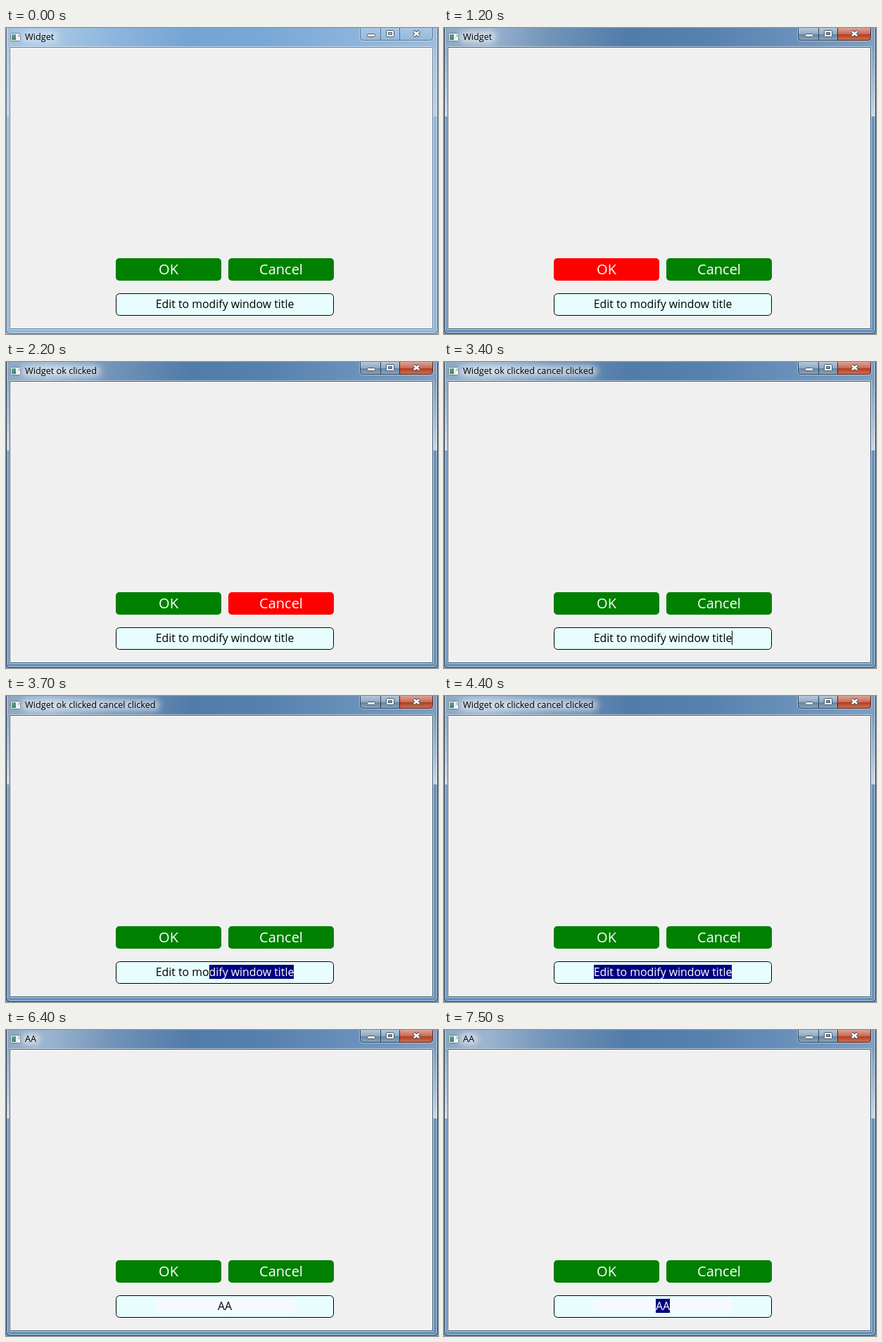
Animation of 614 by 436 pixels, one loop 8000 ms. Source, as an HTML page with a canvas:

```html
<!DOCTYPE html>
<html lang="en">
<head>
<meta charset="utf-8">
<title>Widget</title>
<style>
  html, body { margin: 0; width: 100%; height: 100%; overflow: hidden; }
  canvas { display: block; }
</style>
</head>
<body>
<canvas id="stage" width="614" height="436"></canvas>
<script>
const ctx = document.getElementById('stage').getContext('2d');
const LOOP = 8000;
const FONT = '"Open Sans", "Noto Sans", sans-serif';
const HINT = 'Edit to modify window title';

// Each entry overrides part of the state from its time on.
const timeline = [
  [0, { title: 'Widget', text: HINT, active: false, pressed: '', caret: false, from: null, edited: false }],
  [1200, { active: true, pressed: 'OK' }],
  [1300, { pressed: '', title: 'Widget ok clicked' }],
  [2200, { pressed: 'Cancel' }],
  [2300, { pressed: '', title: 'Widget ok clicked cancel clicked' }],
  [3400, { caret: true }],
  [3500, { from: 24 }],
  [3600, { from: 18 }],
  [3700, { from: 10 }],
  [3800, { from: 3 }],
  [3900, { from: 0 }],
  [4400, { caret: false }],
  [4600, { title: 'A', text: 'A', caret: true, from: null, edited: true }],
  [4800, { title: 'AA', text: 'AA' }],
  [5300, { caret: false }],
  [5800, { caret: true }],
  [6400, { caret: false }],
  [6900, { from: 0 }],
  [7400, { caret: true }],
  [7500, { caret: false }]
];

function stateAt(time) {
  return Object.assign({}, ...timeline.filter(step => step[0] <= time).map(step => step[1]));
}

function gradient(x0, y0, x1, y1, stops) {
  const g = ctx.createLinearGradient(x0, y0, x1, y1);
  stops.forEach(([at, color]) => g.addColorStop(at, color));
  return g;
}

function rect(x, y, w, h, fill) {
  ctx.fillStyle = fill;
  ctx.fillRect(x, y, w, h);
}

function box(x, y, w, h, radius, fill, stroke) {
  ctx.beginPath();
  ctx.roundRect(x, y, w, h, radius);
  if (fill) { ctx.fillStyle = fill; ctx.fill(); }
  if (stroke) { ctx.strokeStyle = stroke; ctx.lineWidth = 1; ctx.stroke(); }
}

function label(text, x, y, size, color, align = 'left') {
  ctx.font = `${size}px ${FONT}`;
  ctx.textAlign = align;
  ctx.fillStyle = color;
  ctx.fillText(text, x, y);
}

function drawFrame(active) {
  const bar = active
    ? ['#8ba7c4', '#9bb4cf', '#7193b8', '#517ba9', '#5680ad', '#6890ba', '#7c9fc4']
    : ['#a3c3e2', '#a9c8e5', '#8db5dd', '#74a4d4', '#79a8d6', '#8ab3dc', '#9abde0'];
  const stops = [0, .1, .25, .43, .6, .8, 1].map((at, i) => [at, bar[i]]);
  rect(0, 0, 614, 436, active ? '#6792bd' : '#8fb6de');
  rect(0, 0, 614, 28, gradient(0, 0, 610, 50, stops));

  // Light reflection on both sides, ending in a hard edge
  const shine = active
    ? [[0, '#819fbe'], [.6, '#a6bed6'], [1, '#c8d8e7']]
    : [[0, '#a0c1e1'], [1, '#b8d1e9']];
  for (const x of [0, 607]) rect(x, 28, 7, 98, gradient(0, 28, 0, 126, shine));

  box(.5, -6.5, 613, 442, 6, null, active ? '#1c2b3b' : '#4d6278');
  box(1.5, -5.5, 611, 440, 5, null, 'rgba(255,255,255,.55)');
  box(4.5, 26.5, 603, 403, 1, null, 'rgba(255,255,255,.6)');
  box(5.5, 27.5, 601, 401, 0, '#f0f0f0', active ? '#3e566f' : '#62798f');
}

function drawIcon() {
  box(6.5, 7.5, 14, 11, 1, '#fafcfc', '#6d7882');
  rect(8, 9, 6, 8, gradient(8, 9, 14, 17, [[0, '#6fa6a0'], [1, '#2d8062']]));
  rect(15, 9, 2, 8, '#e2e9ed');
  rect(18, 9, 1, 4, '#4a8b80');
}

function drawTitle(title, active) {
  ctx.font = `12.7px ${FONT}`;
  const width = ctx.measureText(title).width;
  ctx.save();
  ctx.filter = 'blur(5px)';
  box(22, 5, width + 11, 16, 8, `rgba(255,255,255,${active ? .58 : .42})`);
  ctx.restore();
  label(title, 27, 17, 12.7, '#000');
}

function drawCaptionButtons(active) {
  const edge = active ? '#2f4359' : '#597795';
  const glass = active
    ? [[0, '#b5c7d9'], [.48, '#8fa9c3'], [.5, '#64849f'], [1, '#88a9c6']]
    : [[0, '#a9c7e5'], [1, '#94b8dc']];
  const red = [[0, '#dda295'], [.48, '#c66b56'], [.5, '#b23a22'], [1, '#d5764f']];
  const fill = gradient(0, 0, 0, 18, glass);
  box(502.5, -4.5, 105, 23, 5, null, 'rgba(255,255,255,.45)');
  box(503.5, -5.5, 30, 23, [0, 0, 0, 4], fill, edge);
  box(532.5, -5.5, 27, 23, 0, fill, edge);
  box(559.5, -5.5, 47, 23, [0, 0, 4, 0], active ? gradient(0, 0, 0, 18, red) : fill, active ? '#4b2224' : edge);

  const ink = '#465666';
  box(513.5, 8.5, 11, 4, 1, '#fff', ink);
  box(540.5, 3.5, 11, 9, 1, '#fff', ink);
  box(543.5, 6.5, 5, 3, 0, active ? '#7894ae' : '#9cbddd', ink);

  for (const [color, width, inset] of [[ink, 4.6, 0], ['#fff', 2.6, .4]]) {
    const l = 579.5 + inset, r = 587.5 - inset, t = 4.5 + inset, b = 11.5 - inset;
    ctx.strokeStyle = color;
    ctx.lineWidth = width;
    ctx.beginPath();
    ctx.moveTo(l, t); ctx.lineTo(r, b);
    ctx.moveTo(r, t); ctx.lineTo(l, b);
    ctx.stroke();
  }
}

function drawButton(text, x, pressed) {
  box(x, 328, 150, 32, 5, pressed === text ? '#f00' : '#008000');
  label(text, x + 75, 351, 20, '#fff', 'center');
}

function drawField({ text, caret, from, edited }) {
  const size = 15.86;
  box(156.5, 378.5, 309, 31, 5, '#e8fdfe', '#000');
  if (edited) rect(212, 383, 198, 20, '#f6faff');

  ctx.font = `${size}px ${FONT}`;
  const width = ctx.measureText(text).width;
  const left = 311 - width / 2;
  const right = Math.round(left + width);
  label(text, left, 399, size, '#000');

  let caretX = right;
  if (from !== null) {
    caretX = Math.round(left + ctx.measureText(text.slice(0, from)).width);
    ctx.save();
    ctx.beginPath();
    ctx.rect(caretX, 383, right - caretX, 20);
    ctx.clip();
    rect(caretX, 383, right - caretX, 20, '#000080');
    label(text, left, 399, size, '#fff');
    ctx.restore();
  }
  if (caret) rect(caretX, 383, 1, 20, '#000');
}

function draw(time) {
  const state = stateAt(time);
  drawFrame(state.active);
  drawIcon();
  drawTitle(state.title, state.active);
  drawCaptionButtons(state.active);
  drawButton('OK', 156, state.pressed);
  drawButton('Cancel', 316, state.pressed);
  drawField(state);
}

const start = performance.now();
function tick() {
  draw((performance.now() - start) % LOOP);
  requestAnimationFrame(tick);
}
tick();
</script>
</body>
</html>
```
